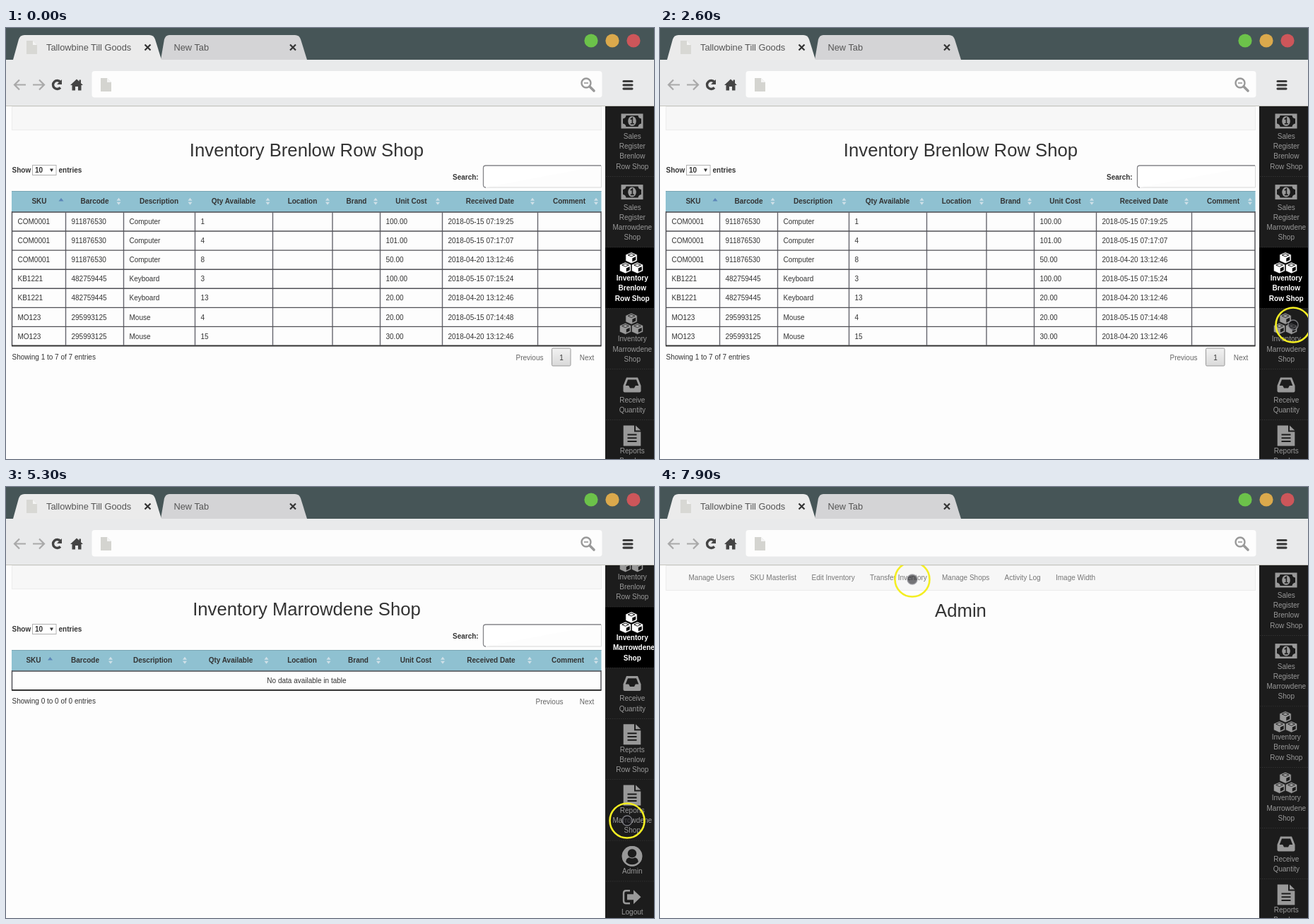
An HTML page for the animation above (8 s loop, 917 by 611 pixels).

```html
<!DOCTYPE html>
<html lang="en">
<head>
<meta charset="utf-8">
<title>Inventory</title>
<style>
html, body { margin: 0; width: 100%; height: 100%; overflow: hidden; background: #fdfdfd; }
svg { display: block; width: 917px; height: 611px; font: 10px "Liberation Sans", Arial, sans-serif; }
.b { font-weight: bold; }
.m { text-anchor: middle; }
</style>
</head>
<body>
<svg id="stage" viewBox="0 0 917 611"></svg>
<script>
const LOOP = 8000;
const FIRST = 'Brenlow Row Shop', SECOND = 'Marrowdene Shop';
const stage = document.getElementById('stage');

const rect = (x, y, w, h, fill, extra = '') =>
  `<rect x="${x}" y="${y}" width="${w}" height="${h}" fill="${fill}" ${extra}/>`;
const path = (d, fill, stroke = 'none', width = 1, extra = '') =>
  `<path d="${d}" fill="${fill}" stroke="${stroke}" stroke-width="${width}" ${extra}/>`;
const circle = (x, y, r, fill, extra = '') =>
  `<circle cx="${x}" cy="${y}" r="${r}" fill="${fill}" ${extra}/>`;
const text = (x, y, s, cls = '', fill = '#333', size = 10) =>
  `<text x="${x}" y="${y}" class="${cls}" fill="${fill}" font-size="${size}">${s}</text>`;

// Browser frame
function chrome() {
  const cross = x => path(`M${x - 4} 23.5l8 8m0-8l-8 8`, 'none', '#333', 2.2);
  const sheet = (x, y, c) => path(`M${x} ${y}h9l6 6v13h-15z`, c) + path(`M${x + 9} ${y}v6h6z`, '#f4f4f4');
  const arrow = (x, dir) => path(`M${x} 80.5h${16 * dir}M${x + 7 * dir} 73.5l${-7 * dir} 7l${7 * dir} 7`, 'none', '#a9a9a9', 2.2);
  return rect(0, 0, 917, 45, '#465557') +
    rect(0, 45, 917, 66, '#e9eaeb') +
    path('M219 45L224 16Q226 10 231 10H409Q415 10 417 16L426 45z', '#d4d4d6') +
    path('M10 45L18 16Q20 10 26 10H203Q209 10 211 16L220 45z', '#ebebeb') +
    sheet(29, 18, '#d8d8d4') +
    text(57, 32, 'Tallowbine Till Goods', '', '#555', 12.8) + cross(200.5) +
    text(237.5, 32, 'New Tab', '', '#555', 12.8) + cross(406) +
    circle(828, 18, 9.6, '#6cc24a') + circle(858, 18, 9.6, '#dba94c') + circle(888, 18, 9.6, '#cd565a') +
    arrow(12, 1) + arrow(54, -1) +
    path('M77 76.5A6 6 0 1 0 77 84.5', 'none', '#444', 3.4) + path('M79 73v7h-7z', '#444') +
    path('M91 81L100 72.5L103.5 75.8V73.5H106V78.2L109 81H106.5V88.5H102V83H98V88.5H93.5V81z', '#444') +
    rect(121.5, 61, 722, 37.5, '#fdfdfd', 'rx="4"') + sheet(134, 71, '#d4d4d0') +
    circle(821, 78, 6.5, 'none', 'stroke="#999" stroke-width="2.4"') +
    path('M826 83l6 6', 'none', '#999', 3.6, 'stroke-linecap="round"') + path('M818 78h6', 'none', '#999', 1.6) +
    path('M874 75.5h12M874 80.8h12M874 86.1h12', 'none', '#3c3c3c', 3.2, 'stroke-linecap="round"') +
    rect(0, 110, 917, 1, '#c4c4bd');
}

const strip = h => rect(8.5, 111.5, 834, h, '#f7f7f7', 'stroke="#ececec"');
const heading = (s, y) => text(425.5, y, s, 'm', '#333', 25.7);
const LABELS = ['SKU', 'Barcode', 'Description', 'Qty Available', 'Location', 'Brand', 'Unit Cost', 'Received Date', 'Comment'];

function sorter(x, i) {
  return i ? path(`M${x - 3} 244.8l3-4 3 4zM${x - 3} 246.8l3 4 3-4z`, '#cfe0e8')
    : path(`M${x - 3.5} 245.5l3.5-4.5 3.5 4.5z`, '#5c86b8');
}

function listing(shop, centres, sorters, bottom) {
  return strip(33) + heading('Inventory ' + shop, 182) +
    text(8.5, 205, 'Show', 'b') + text(74.5, 205, 'entries', 'b') +
    rect(37.5, 194.5, 33.5, 14, '#fff', 'stroke="#b0b0b0"') + text(41, 205, '10', 'b') +
    path('M62 199.5h5l-2.5 4.5z', '#333') +
    text(632, 215, 'Search:', 'b') +
    path('M842.5 195V226H678', 'none', '#d8d8d8') +
    path('M842 195H679Q675.5 195 675.5 198.5V222.5Q675.5 226 679 226', '#fff', '#858589', 1.3) +
    rect(8, 231, 834.5, 30, '#8fc1d1') + path('M8 231.5H842.5', 'none', '#79a5b3') +
    LABELS.map((s, i) => text(centres[i], 249, s, 'b m') + sorter(sorters[i], i)).join('') +
    path(`M8.5 260V${bottom}M842 260V${bottom}M8 261H842.5`, 'none', '#4c4c52', 1.4) +
    path(`M8 ${bottom}H842.5`, 'none', '#333', 1.8) +
    text(822, bottom + 20, 'Next', 'm', '#666');
}

function stockPage() {
  const edges = [8.5, 84.5, 166.5, 267.5, 377.5, 462, 529.5, 617.5, 752.5];
  const goods = { C: ['COM0001', '911876530', 'Computer'], K: ['KB1221', '482759445', 'Keyboard'], M: ['MO123', '295993125', 'Mouse'] };
  const older = '2018-04-20 13:12:46', may = '2018-05-15 07:';
  const rows = [
    ['C', 1, '100.00', may + '19:25'], ['C', 4, '101.00', may + '17:07'], ['C', 8, '50.00', older],
    ['K', 3, '100.00', may + '15:24'], ['K', 13, '20.00', older],
    ['M', 4, '20.00', may + '14:48'], ['M', 15, '30.00', older]
  ];
  let out = listing(FIRST, [47, 125.5, 216.5, 322, 419.5, 496, 573.5, 685, 797],
    [78, 159.5, 260.5, 370.5, 455, 523, 611, 745, 835], 450.5);
  out += path(edges.slice(1).map(x => `M${x} 261V450`).join(''), 'none', '#66666e', 1.4);
  rows.forEach(([kind, qty, cost, date], r) => {
    const y = 278 + r * 27.1;
    if (r) out += path(`M8 ${261 + r * 27.07}H842`, 'none', '#505056', 1.4);
    [...goods[kind], qty, '', '', cost, date].forEach((s, c) => out += text(edges[c] + 8, y, s));
  });
  return out + text(8.5, 470, 'Showing 1 to 7 of 7 entries') + text(741, 470.5, 'Previous', 'm', '#666') +
    rect(772.5, 454, 26.5, 25, 'url(#button)', 'stroke="#999" rx="1.5"') + text(786, 470.5, '1', 'm');
}

function emptyPage() {
  return listing(SECOND, [39, 112, 207.5, 318, 419, 498.5, 580, 686.5, 795],
    [62.5, 148, 253, 368.5, 456.5, 527, 618, 741, 835], 288) +
    text(425.5, 278, 'No data available in table', 'm') +
    text(8.5, 307, 'Showing 0 to 0 of 0 entries') + text(769, 308, 'Previous', 'm', '#666');
}

function adminPage() {
  const links = { 'Manage Users': 40.5, 'SKU Masterlist': 127, 'Edit Inventory': 214.5, 'Transfer Inventory': 297,
    'Manage Shops': 399, 'Activity Log': 487.5, 'Image Width': 560 };
  return strip(35) + heading('Admin', 183.5) +
    Object.entries(links).map(([s, x]) => text(x, 132, s, '', '#777')).join('');
}

// Sidebar icons, drawn around their own centre
const ICONS = {
  money: (c, bg) => rect(-15.5, -10.5, 31, 21, c) +
    path('M-8.5-8H8.5Q9 -4 13-3.5V3.5Q9 4 8.5 8H-8.5Q-9 4-13 3.5V-3.5Q-9-4-8.5-8z', bg) +
    `<ellipse rx="5.8" ry="7" fill="${c}"/>` + path('M-2.2-2.5L.4-4.5V3.5M-2.2 3.8h5', 'none', bg, 1.6),
  cubes: (c, bg) => [[-1, -7.5], [-9.5, 6.7], [7.5, 6.7]].map(([x, y]) => `<g transform="translate(${x} ${y})">` +
    path('M0-8L8.2-4.5V4.5L0 8.2L-8.2 4.5V-4.5z', c, bg, .8) +
    path('M0-5.8L4.8-3.8L0-1.7L-4.8-3.8z', bg === '#000' ? c : '#aaa', bg, .9) +
    path('M1.3.7L6.2-1.6V3.3L1.3 5.6z', bg) + '</g>').join(''),
  inbox: (c, bg) => path('M-8-10.5H8L12.5 1V8.5Q12.5 10.5 10.5 10.5H-10.5Q-12.5 10.5-12.5 8.5V1z', c) +
    path('M-6-7.3H6L9.3 1H4.8L3 4.5H-3L-4.8 1H-9.3z', bg),
  file: (c, bg) => path('M-12.3-14.5H3V-5.5H12.3V14.5H-12.3z', c) + path('M5-14.5L12.3-7.5H5z', c) +
    path('M-6.5-1.5H6.5M-6.5 3.3H6.5M-6.5 8H6.5', 'none', bg, 2.1),
  user: (c, bg) => circle(0, 0, 14.3, c) +
    path('M-8.8 8.2Q-8.5 2.5-4 1.8Q0 4.5 4 1.8Q8.5 2.5 8.8 8.2A12 12 0 0 1-8.8 8.2z', bg) + circle(0, -4, 6.2, bg) +
    circle(0, 0, 13.2, 'none', `stroke="${c}" stroke-width="2.2"`),
  exit: c => path('M-3-9H-8.5Q-12-9-12-5.5V5.5Q-12 9-8.5 9H-3', 'none', c, 2.4) +
    path('M-7-4H2V-10L12.5 0L2 10V4H-7z', c)
};
const shopLines = [['Brenlow', 'Row Shop'], ['Marrowdene', 'Shop']];
const ITEMS = [
  ['money', 'Sales', 'Register', ...shopLines[0]], ['money', 'Sales', 'Register', ...shopLines[1]],
  ['cubes', 'Inventory', ...shopLines[0]], ['cubes', 'Inventory', ...shopLines[1]],
  ['inbox', 'Receive', 'Quantity'],
  ['file', 'Reports', ...shopLines[0]], ['file', 'Reports', ...shopLines[1]],
  ['user', 'Admin'], ['exit', 'Logout']
];
const ADMIN = 7;

function sidebar(active, hover) {
  let top = 110;
  return ITEMS.map(([icon, ...lines], i) => {
    const on = i === active, lit = on || i === hover;
    const colour = lit ? '#fff' : '#999', bg = on ? '#000' : lit ? '#2c2c2c' : '#1c1c1c';
    const height = 43.6 + 14.25 * lines.length;
    let out = rect(848, top, 69, height, bg) +
      path(`M849 ${top + height}H917`, 'none', '#484848', 1, 'stroke-dasharray="1.5 1.5"') +
      `<g transform="translate(886 ${top + 22})">${ICONS[icon](colour, bg)}</g>`;
    lines.forEach((s, n) => {
      const wide = on && s.length > 9;
      out += text(wide ? 859 : 886.3, top + 46.9 + n * 14.25, s, (on ? 'b ' : '') + (wide ? '' : 'm'), colour);
    });
    top += height;
    return out;
  }).join('');
}

stage.innerHTML = `<defs>
  <linearGradient id="button" x2="0" y2="1"><stop stop-color="#f2f2f2"/><stop offset="1" stop-color="#d9d9d9"/></linearGradient>
  <clipPath id="view"><rect x="848" y="111" width="69" height="500"/></clipPath>
  <clipPath id="body"><rect y="111" width="917" height="500"/></clipPath></defs>` +
  rect(0, 0, 917, 611, '#fdfdfd') +
  [stockPage, emptyPage, adminPage].map((page, i) => `<g id="page${i}">${page()}</g>`).join('') +
  rect(848, 111, 69, 500, '#1c1c1c') + `<g clip-path="url(#view)"><g id="menu"></g></g>` + chrome() +
  `<g clip-path="url(#body)"><g id="cursor">` +
  circle(0, 0, 7, 'rgba(20,20,25,.58)', 'stroke="#9a9aa0" stroke-opacity=".75" stroke-width="1.4"') +
  circle(0, 0, 24.5, 'none', 'id="halo" stroke="#f4ee22" stroke-width="2.6"') +
  circle(0, 0, 8, 'none', 'id="pulse" stroke="#7b82cc" stroke-width="2"') + '</g></g>';

const el = id => document.getElementById(id);
const [menu, cursor, halo, pulse] = ['menu', 'cursor', 'halo', 'pulse'].map(el);
const pages = [0, 1, 2].map(i => el('page' + i));

// Cursor stops: time, x, y
const ROUTE = [
  [300, 560, 345], [650, 410, 340], [1000, 470, 178], [1400, 691, 249], [2200, 896, 421], [3800, 896, 421],
  [4400, 905, 469], [4700, 905, 469], [5250, 879, 473], [5700, 879, 473], [6300, 881, 527], [7150, 881, 527],
  [7400, 715, 228], [7650, 310, 150], [7850, 357, 131]
];
const CLICKS = [2950, 6700];
const clamp = v => Math.max(0, Math.min(1, v));
const ease = v => v * v * (3 - 2 * v);

function cursorAt(t) {
  const n = ROUTE.findIndex(p => p[0] > t);
  if (n < 0) return ROUTE[ROUTE.length - 1].slice(1);
  if (!n) return ROUTE[0].slice(1);
  const [t0, x0, y0] = ROUTE[n - 1], [t1, x1, y1] = ROUTE[n];
  const k = ease((t - t0) / (t1 - t0));
  return [x0 + (x1 - x0) * k, y0 + (y1 - y0) * k];
}

let shown = '';
function draw(t) {
  const page = t < 3300 ? 0 : t < 7100 ? 1 : 2;
  const hover = page === 1 && t >= 6150 ? ADMIN : -1;
  const key = page + ':' + hover;
  if (key !== shown) {
    shown = key;
    pages.forEach((g, i) => g.style.display = i === page ? '' : 'none');
    menu.innerHTML = sidebar([2, 3, ADMIN][page], hover);
  }
  const scroll = page === 1 ? 227.3 * ease(clamp((t - 4700) / 500)) : 0;
  menu.setAttribute('transform', `translate(0 ${-scroll})`);

  const [x, y] = cursorAt(t);
  cursor.setAttribute('transform', `translate(${x} ${y})`);
  cursor.style.opacity = clamp((t - 300) / 150);
  const click = CLICKS.find(c => t >= c && t < c + 350);
  halo.style.display = click ? 'none' : '';
  pulse.style.display = click ? '' : 'none';
  if (click) {
    const k = (t - click) / 350;
    pulse.setAttribute('r', 6 + 14 * k);
    pulse.style.opacity = 1 - k;
  }
}

function tick(now) {
  draw(now % LOOP);
  requestAnimationFrame(tick);
}
draw(0);
requestAnimationFrame(tick);
</script>
</body>
</html>
```
